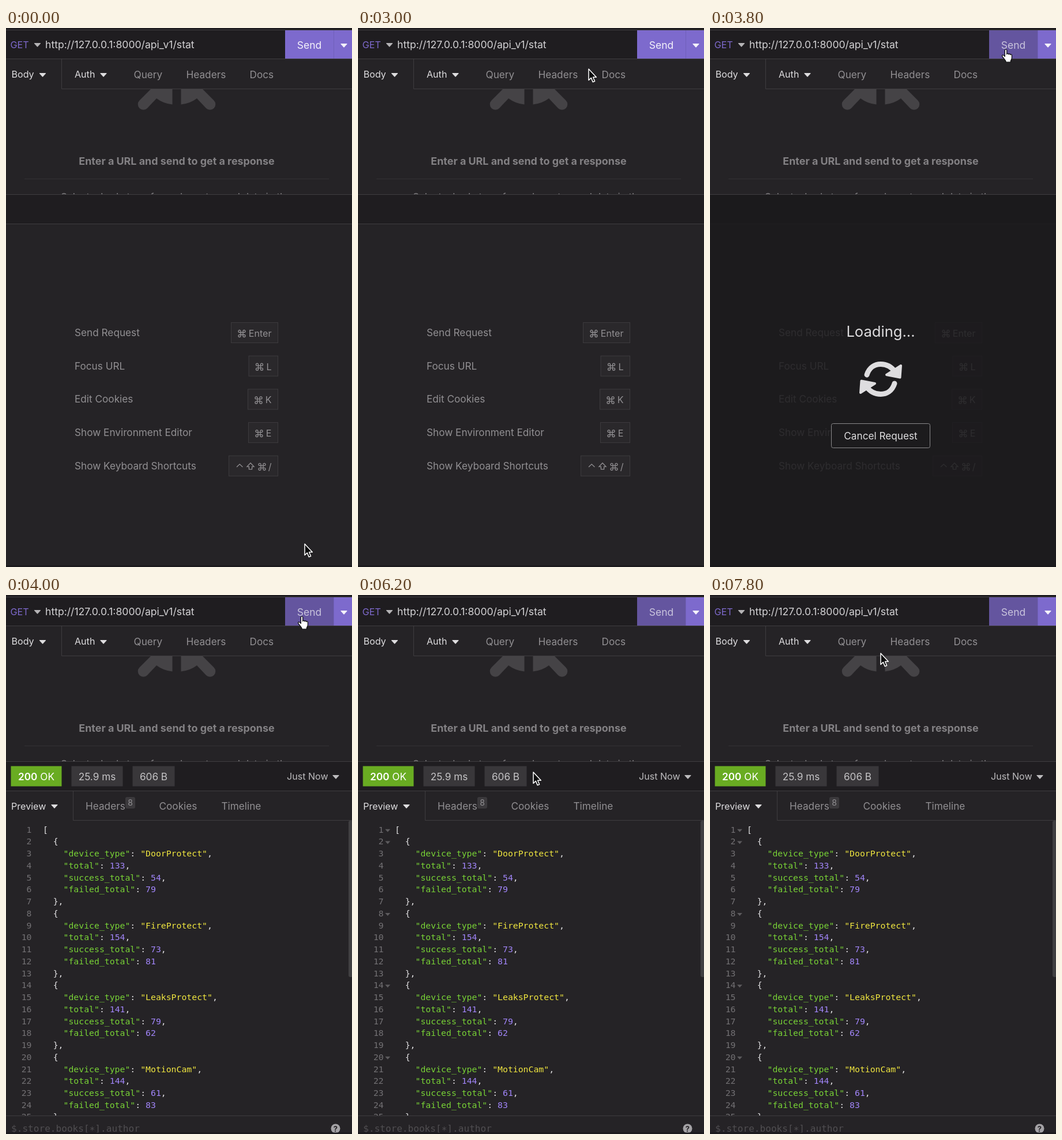
Recreate the animation shown at these times as an HTML page. Size 600 by 934 pixels, loop 8 s.

```html
<!DOCTYPE html>
<html lang="en">
<head>
<meta charset="utf-8">
<title>API client</title>
<style>
  html, body { margin: 0; width: 100%; height: 100%; overflow: hidden; background: #252326; }
  svg { display: block; width: 600px; height: 934px; }
  text { font: 17.2px Inter, sans-serif; font-optical-sizing: none; fill: #918f92; white-space: pre; }
  .light { fill: #dedddf; }
  .menu { font-size: 16.1px; }
  .mid { text-anchor: middle; }
  .code { font: 14.8px "DejaVu Sans Mono", monospace; fill: #e2e1e3; }
  .number { fill: #737174; text-anchor: end; }
  .key { fill: #78d236; }
  .string { fill: #f0e63f; }
  .value { fill: #a286fb; }
</style>
</head>
<body>
<svg viewBox="0 0 600 934">
  <defs>
    <clipPath id="codeClip"><path d="M0 391h600v511H0z"/></clipPath>
    <clipPath id="bodyClip"><path d="M0 106h600v182H0z"/></clipPath>
    <path id="caret" d="M-5 -2.5H5L0 3Z" stroke-width="1.2" stroke-linejoin="round"/>
    <path id="command" d="M4 4V2a2 2 0 1 0-2 2h8a2 2 0 1 0-2-2v8a2 2 0 1 0 2-2H2a2 2 0 1 0 2 2z"
      fill="none" stroke="#918f92" stroke-width="1.3"/>
    <path id="leg" d="M252 105L231.5 125.5a9.5 9.5 0 0 0 13.5 13.5L261 122Q273 131 288.5 132.5V105Z"/>
    <g id="syncHalf">
      <path d="M272 601C276 588 286 582.5 296 582.5S314 586 321 596" fill="none" stroke-width="9" stroke-linecap="round"/>
      <path d="M331 585L329.5 605.5L306 601Z" stroke-width="4" stroke-linejoin="round"/>
    </g>
  </defs>
  <path d="M0 0h600v934H0z" fill="#252326"/>
  <g id="request"></g>
  <g id="empty"></g>
  <g id="loading"></g>
  <g id="response"></g>
  <path d="M0 932.5h600" stroke="#19181a" stroke-width="2"/>
  <path id="arrow" d="M1 1V20.5L5.3 16.4L8.3 23.6L11.6 22.2L8.6 15.2H14.3Z"
    fill="#0b0b0c" stroke="#fff" stroke-width="1.5" stroke-linejoin="round"/>
  <g id="hand">
    <path transform="scale(1.12)" d="M-1.5 1.5c0-2 3-2 3 0v6c.3-1.3 2.7-1.2 2.8.3c.5-1.1 2.5-.9 2.6.5c.6-.9 2.4-.6 2.4 1v4c0 2-1.8 3-1.8 5v1.5H0v-1.5C-1.5 15.5-4.5 12.5-5.5 10.8c-.8-1.6 1-2.6 2.2-1.5L-1.5 11z"
      fill="#fff" stroke="#0b0b0c" stroke-width="1.1" stroke-linejoin="round"/>
  </g>
</svg>
<script>
const $ = id => document.getElementById(id);
const DURATION = 8000, STEP = 200;
const BAR = '#1f1d20', LINE = '#3f3d40';

const rect = (x, y, w, h, fill, extra = '') =>
  `<rect x="${x}" y="${y}" width="${w}" height="${h}" fill="${fill}" ${extra}/>`;
const label = (x, y, str, cls = '', style = '', extra = '') =>
  `<text x="${x}" y="${y}" class="${cls}" style="${style}" ${extra}>${str}</text>`;
const line = (d, color = LINE, width = 1) =>
  `<path d="${d}" fill="none" stroke="${color}" stroke-width="${width}"/>`;
const caret = (x, y, color = '#dedddf') =>
  `<use href="#caret" x="${x}" y="${y}" fill="${color}" stroke="${color}"/>`;

$('request').innerHTML =
  rect(0, 0, 600, 54, BAR) + line('M0 3.5H600M0 53.5H600') +
  label(7.5, 35, 'GET', '', 'fill:#7d69cb;font-size:16.2px') + caret(54.5, 29, '#b5b4b6') +
  label(68, 35, 'http://127.0.0.1:8000/api_v1/stat', '', 'fill:#d3d2d4;font-size:17.6px') +
  rect(484, 4, 84, 49, '#7d6acd', 'id="send"') + rect(568, 4, 32, 49, '#7d6acd') +
  line('M568.5 4V53', '#7160ba') +
  label(526, 36, 'Send', 'mid', 'font-size:17.5px', 'id="sendLabel"') +
  caret(586, 30, '#f4f2fa') +
  line('M96.5 54V105.5H600') +
  label(9.5, 86, 'Body', 'light menu') + caret(63.5, 81) +
  label(119, 86, 'Auth', 'light menu') + caret(169, 81) +
  label(221.5, 87, 'Query') + label(312.5, 87, 'Headers') + label(422.5, 87, 'Docs') +
  `<g clip-path="url(#bodyClip)">
    <g fill="#454346"><use href="#leg"/><use href="#leg" transform="translate(592) scale(-1 1)"/></g>
    ${label(296, 237, 'Enter a URL and send to get a response', 'mid', 'font-size:17.9px;font-weight:700;fill:#838184')}
    ${line('M32 261.5H560', '#343235')}
    ${label(295, 299, 'Select a body type from above to send data in the', 'mid', 'font-size:17px;fill:#838184')}
  </g>` +
  rect(0, 289, 600, 50, BAR) + line('M0 288.5H600M0 339.5H600');

const command = (x, y) => `<use href="#command" x="${x}" y="${y - 6}"/>`;
const shortcuts = [
  ['Send Request', 390, 'Enter'],
  ['Focus URL', 420.5, 'L'],
  ['Edit Cookies', 419, 'K'],
  ['Show Environment Editor', 420, 'E'],
  ['Show Keyboard Shortcuts', 386, '/'],
];
$('empty').innerHTML = shortcuts.map(([name, x, key], i) => {
  const y = 528 + i * 57.7;
  const combo = key === '/';
  const modifiers = combo
    ? line(`M400 ${y + 2}l5.2 -5l5.2 5M424 ${y - 5}l6 6.3h-3.4v4.5h-5.2v-4.5h-3.4z`, '#918f92', 1.3) : '';
  return label(119, y + 6, name) +
    rect(x + .5, y - 17.5, 471.5 - x - .5, 35, '#2a282b', 'stroke="#3d3b3e"') +
    modifiers + command(combo ? 438 : x + 13, y + 1.5) +
    label(460.5, y + 7, key, '', 'font-size:16.1px;text-anchor:end');
}).join('');

$('loading').innerHTML =
  rect(0, 289, 600, 645, '#1b1a1c', 'opacity=".84"') +
  label(296, 535, 'Loading...', 'mid light', 'font-size:25.6px') +
  `<g fill="#dedddf" stroke="#dedddf"><use href="#syncHalf"/>
   <use href="#syncHalf" transform="rotate(180 296 608.5)"/></g>` +
  rect(210.5, 685.5, 171, 42, '#1c1b1d', 'rx="3" stroke="#8b8a8c"') +
  label(296, 713, 'Cancel Request', 'mid light');

const devices = [
  ['DoorProtect', 133, 54, 79],
  ['FireProtect', 154, 73, 81],
  ['LeaksProtect', 141, 79, 62],
  ['MotionCam', 144, 61, 83],
];
const span = (cls, str) => `<tspan class="${cls}">${str}</tspan>`;
const field = (name, cls, value, end = ',') =>
  `    ${span('key', `"${name}"`)}: ${span(cls, value)}${end}`;
const codeLines = ['[', ...devices.flatMap(([type, total, success, failed]) => [
  '  {',
  field('device_type', 'string', `"${type}"`),
  field('total', 'value', total),
  field('success_total', 'value', success),
  field('failed_total', 'value', failed, ''),
  '  },',
])];
const baseline = i => 411.7 + i * 20.74;
const code = codeLines.map((str, i) =>
  label(44.5, baseline(i), i + 1, 'code number') + label(63.9, baseline(i), str, 'code')).join('');
const folds = codeLines.map((str, i) => /[[{]$/.test(str)
  ? `<path d="M47 ${baseline(i) - 6}h9l-4.5 5z" fill="#5d5b5e"/>` : '').join('');

$('response').innerHTML =
  rect(0, 340, 600, 594, '#252326') +
  rect(8.5, 296.5, 88, 35, '#69ac22') +
  label(52.5, 321, '<tspan font-weight="600">200</tspan> OK', 'mid', 'fill:#fff') +
  rect(113.5, 296.5, 89, 35, '#39373a') + label(158, 321, '25.9 ms', 'mid', 'fill:#c5c4c6') +
  rect(219.5, 296.5, 73, 35, '#39373a') + label(256, 321, '606 B', 'mid', 'fill:#c5c4c6') +
  label(487, 320, 'Just Now', 'menu', 'fill:#bdbcbe') + caret(572, 315, '#bdbcbe') +
  line('M116.5 340V390.5H600') +
  label(9, 371.5, 'Preview', 'light menu') + caret(84, 366) +
  label(138, 372, 'Headers') + rect(207, 350, 17, 20, '#3b393c', 'rx="3"') +
  label(215.5, 365, '8', 'mid', 'font-size:14px') +
  label(265.5, 372, 'Cookies') + label(373.5, 372, 'Timeline') +
  `<g clip-path="url(#codeClip)">${code}<g id="folds">${folds}</g></g>` +
  rect(594, 391, 7, 271, '#414042', 'rx="3"') +
  line('M0 902.5H600') +
  label(9, 930, '$.store.books[<tspan dy="3">*</tspan><tspan dy="-3">]</tspan>.author', 'code',
    'font-size:16.1px;fill:#504e51') +
  '<circle cx="571.5" cy="924.5" r="8" fill="#a4a2a5"/>' +
  label(571.5, 929.5, '?', 'mid', 'font-size:13px;font-weight:700;fill:#252326');

// Cursor tip: time, x, y
const cursorPath = [
  [0, 517, 893], [2400, 517, 893], [3000, 399, 70], [3400, 513, 37], [4800, 513, 37],
  [6000, 303, 306], [6800, 303, 306], [7600, 295, 100], [DURATION, 295, 100],
];
function cursorAt(t) {
  const i = cursorPath.findIndex(point => point[0] > t);
  const [t0, x0, y0] = cursorPath[i - 1], [t1, x1, y1] = cursorPath[i];
  const p = (t - t0) / (t1 - t0), ease = p * p * (3 - 2 * p);
  return [x0 + (x1 - x0) * ease, y0 + (y1 - y0) * ease];
}
const show = (id, visible) => $(id).setAttribute('visibility', visible ? 'visible' : 'hidden');

function render(now) {
  const t = Math.floor((now % DURATION) / STEP) * STEP;
  const [x, y] = cursorAt(t);
  const overSend = x >= 484 && x < 568 && y < 53;
  for (const id of ['arrow', 'hand']) $(id).setAttribute('transform', `translate(${x} ${y})`);
  show('arrow', !overSend);
  show('hand', overSend);
  const sendActive = t >= 3400;
  $('send').setAttribute('fill', sendActive ? '#64559f' : '#7d6acd');
  $('sendLabel').style.fill = sendActive ? '#c9c4dc' : '#f4f2fa';
  show('empty', t < 4000);
  show('loading', t >= 3800 && t < 4000);
  show('response', t >= 4000);
  show('folds', t >= 4600);
}

const start = performance.now();
function tick() {
  render(performance.now() - start);
  requestAnimationFrame(tick);
}
tick();
</script>
</body>
</html>
```
